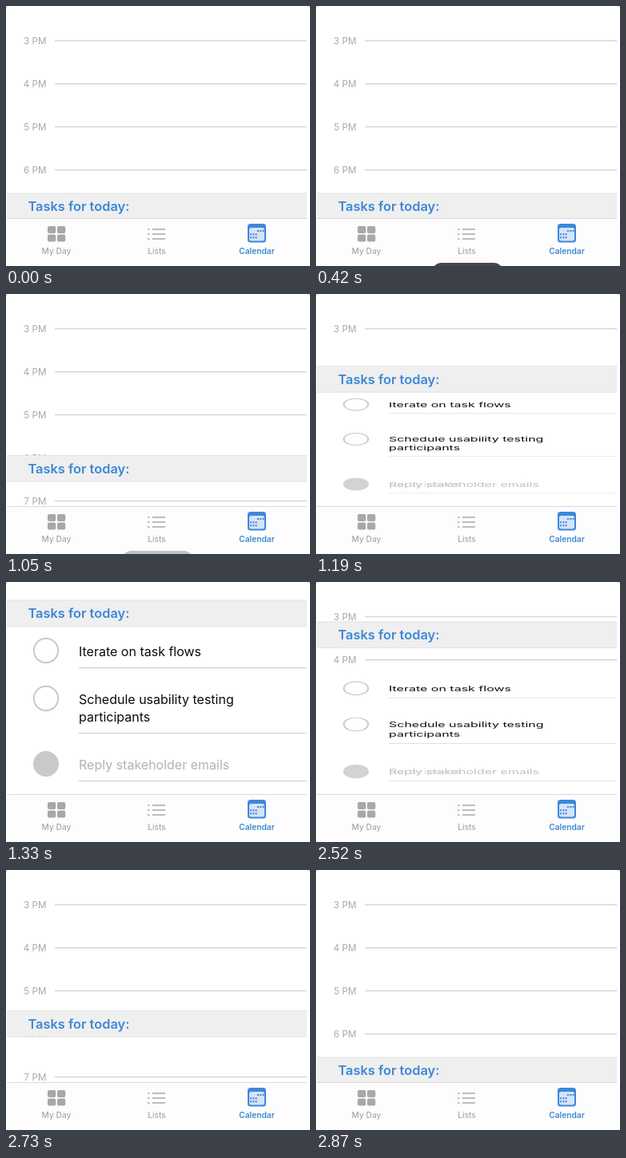
Write an HTML page that moves like this. It is 380 px wide and 326 px high and loops after 3.36 s.

```html
<!DOCTYPE html>
<html lang="en">
<head>
<meta charset="utf-8">
<title>Calendar tasks</title>
<style>
  html, body { margin: 0; width: 100%; height: 100%; overflow: hidden; background: #b8b8b8; }
  svg { display: block; width: 380px; height: 326px; font-family: Inter, Roboto, sans-serif; }
  .hour { font-size: 11.7px; fill: #a9a9ab; text-anchor: end; }
  .title { font-size: 16.4px; font-weight: 600; fill: #3d88d4; }
  .task { font-size: 16px; fill: #0c0c0c; }
  .done { fill: #b2b2b2; }
  .tab { font-size: 10.2px; font-weight: 500; fill: #a8a8aa; text-anchor: middle; }
  .rule { stroke: #d6d6d6; stroke-width: 1.3; }
  .ring { fill: #fff; stroke: #c9c9c9; stroke-width: 2; }
</style>
</head>
<body>
<svg viewBox="0 0 380 326">
  <path d="M0 326V3Q0 0 3 0H377Q380 0 380 3V326Z" fill="#fff"/>
  <g id="hours"></g>

  <g id="list">
    <rect id="panel" x="1" width="375" fill="#fff"/>
    <g class="row">
      <circle class="ring" cx="50" r="15.2"/>
      <text class="task" x="91" y="6.7">Iterate on task flows</text>
      <path class="rule" d="M91 21.5H376"/>
    </g>
    <g class="row">
      <circle class="ring" cx="50" r="15.2"/>
      <text class="task" x="91" y="6.7">Schedule usability testing</text>
      <text class="task" x="91" y="28.7">participants</text>
      <path class="rule" d="M91 43.5H376"/>
    </g>
    <g class="row">
      <circle cx="50" r="16" fill="#c9c9c9"/>
      <text class="task done" x="91" y="6.7">Reply stakeholder emails</text>
      <text class="task done" id="ghost" x="91" y="6.7">participants</text>
      <path class="rule" d="M91 21.5H376"/>
    </g>
  </g>

  <g id="header">
    <rect x="1" width="375" height="33.5" fill="#efeff0"/>
    <path d="M1 .5H376M1 33H376" stroke="#e4e4e5"/>
    <text class="title" x="27.5" y="22.5">Tasks for today:</text>
  </g>

  <rect x="1" y="266" width="378" height="60" fill="#fdfdfd"/>
  <path d="M1 266.5H376" stroke="#dadada"/>
  <g fill="#a8a8aa">
    <rect x="52" y="276" width="10.3" height="9" rx="2"/>
    <rect x="64" y="276" width="10.3" height="9" rx="2"/>
    <rect x="52" y="286.5" width="10.3" height="9" rx="2"/>
    <rect x="64" y="286.5" width="10.3" height="9" rx="2"/>
  </g>
  <g stroke="#a8a8aa" stroke-width="1.7">
    <path d="M177 280H179.5M183 280H199M177 286H179.5M183 286H199M177 292H179.5M183 292H199"/>
  </g>
  <rect x="302" y="273" width="23" height="23.5" rx="3.5" fill="#3d88dc"/>
  <rect x="304" y="278" width="19" height="16.5" rx="2.5" fill="#d5e4f6"/>
  <path d="M314 282H323M305 286.3H314M305 290.3H314" stroke="#3d88dc" stroke-width="2" stroke-dasharray="2 1.3"/>
  <text class="tab" x="63" y="311">My Day</text>
  <text class="tab" x="188.5" y="311">Lists</text>
  <text class="tab" x="313.5" y="311" style="fill:#3d88d4;font-weight:600">Calendar</text>

  <rect id="touch" x="146" y="322" width="87" height="40" rx="10" fill="#484646"/>
</svg>
<script>
const LOOP = 3360, STEP = 70;
const $ = id => document.getElementById(id);
const rows = [...document.querySelectorAll('.row')];
const openY = [86, 146, 228], foldedY = [191, 218, 249];
const lerp = (a, b, k) => a + (b - a) * k;

// Keys are [step, value] pairs; values in between are linear.
const headerTop = [[13, 234.5], [14, 232], [15, 202], [16, 149], [17, 90], [18, 43], [19, 22.5],
  [35, 22.5], [36, 49.5], [37, 89], [38, 133], [39, 176], [40, 213], [41, 234.5]];
const fold = [[15, 1], [16, .85], [17, .5], [18, .16], [19, 0], [35, 0], [36, .45], [37, .74], [38, 1]];
const touch = [[1, 0], [6, 1], [12, 1], [15, .33], [17, 0]];

function at(keys, s) {
  const i = keys.findIndex(k => k[0] >= s);
  if (i < 0) return keys[keys.length - 1][1];
  if (i === 0) return keys[0][1];
  const [s0, a] = keys[i - 1], [s1, b] = keys[i];
  return lerp(a, b, (s - s0) / (s1 - s0));
}

for (let i = 0; i < 5; i++) {
  const y = 43.5 + 54 * i;
  $('hours').innerHTML += `<text class="hour" x="50.5" y="${y + 4.3}">${i + 3} PM</text>
    <path class="rule" d="M61 ${y}H376"/>`;
}

function draw(ms) {
  const s = Math.floor(ms % LOOP / STEP), q = at(fold, s);
  $('header').setAttribute('transform', `translate(0 ${at(headerTop, s)})`);
  $('touch').setAttribute('opacity', at(touch, s));

  $('list').setAttribute('visibility', q < 1 ? 'visible' : 'hidden');
  const top = lerp(55, 182, q);
  $('panel').setAttribute('y', top);
  $('panel').setAttribute('height', 266 - top);
  rows.forEach((row, i) =>
    row.setAttribute('transform', `translate(0 ${lerp(openY[i], foldedY[i], q)}) scale(1 ${1 - q})`));
  rows[2].setAttribute('opacity', q ? .8 : 1);
  $('ghost').setAttribute('opacity', q ? .5 : 0);
}

const start = performance.now();
function tick(now) {
  draw(Math.max(0, now - start));
  requestAnimationFrame(tick);
}
draw(0);
requestAnimationFrame(tick);
</script>
</body>
</html>
```
